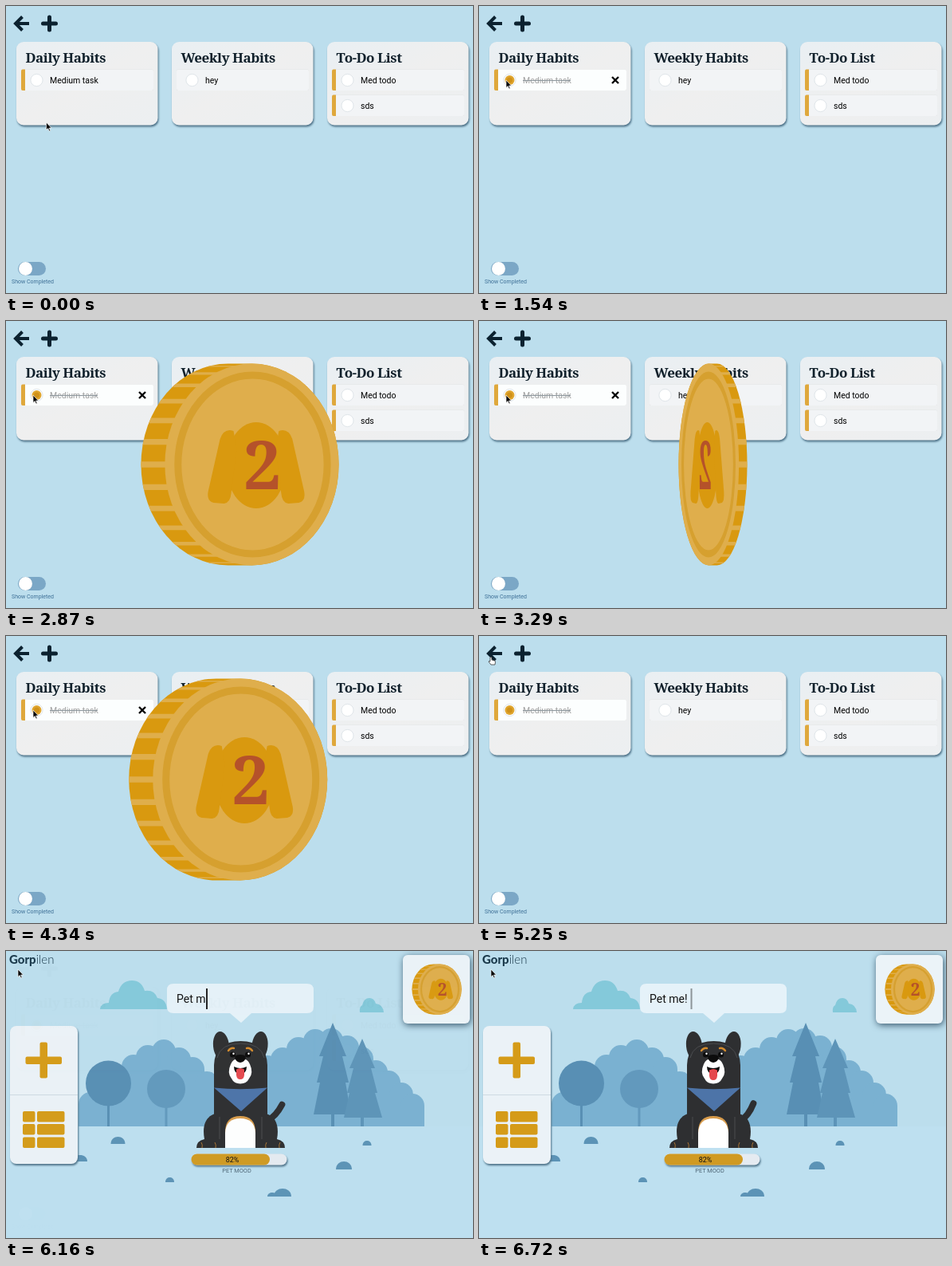
An HTML page for the animation above (6.79 s loop, 586 by 360 pixels).

```html
<!DOCTYPE html>
<html lang="en">
<head>
<meta charset="utf-8">
<style>
  html, body { margin: 0; width: 100%; height: 100%; overflow: hidden; background: #bcdeed; }
  svg { display: block; width: 586px; height: 360px; font-family: Roboto, sans-serif; }
  .title { font: 700 17px "Noto Serif", serif; letter-spacing: -.43px; fill: #10202b; }
  .panel { filter: drop-shadow(1.5px 2px 1.2px #4d7187); }
  .raised { filter: drop-shadow(1px 2px 4px #37566b); }
  .row { filter: drop-shadow(0 .7px .7px #0002); }
</style>
</head>
<body>
<svg viewBox="0 0 586 360">
  <defs>
    <linearGradient id="card" x2="1" y2="1">
      <stop stop-color="#e9eff3"/><stop offset=".5" stop-color="#efefef"/><stop offset="1" stop-color="#eceff1"/>
    </linearGradient>
    <path id="rim" d="M-15-126.5H15A109.5 126.5 0 0 1 15 126.5H-15A109.5 126.5 0 0 1-15-126.5Z"/>
    <clipPath id="rimClip"><use href="#rim"/></clipPath>
    <g id="coin">
      <use href="#rim" fill="#d9990f"/>
      <g id="ridges" clip-path="url(#rimClip)" stroke="#dfae4b"></g>
      <ellipse cx="15" rx="109.5" ry="126.5" fill="#dfae4c"/>
      <ellipse cx="16" rx="94" ry="112" fill="none" stroke="#d6a02f" stroke-width="9"/>
      <g fill="#d9990f">
        <ellipse cx="20.500" cy="1" rx="38" ry="54"/>
        <path id="ear" d="M-8-42Q-20-46-25-32L-40 34Q-42 46-33 48L-20 49Q-12 48-11 36L-4-20Z"/>
        <use href="#ear" transform="matrix(-1 0 0 1 41 0)"/>
      </g>
      <text x="28.500" y="31" text-anchor="middle" fill="#b5522a" style="font:700 84px 'Noto Serif',serif">2</text>
    </g>
  </defs>

  <g id="lists">
    <path d="M29 22H12M20.500 13.500L12 22L20.500 30.500" fill="none" stroke="#0c2230" stroke-width="4"/>
    <path d="M54.500 14V30M46.500 22H62.500" stroke="#0c2230" stroke-width="5" stroke-linecap="round"/>
    <g id="cards"></g>
    <g id="check">
      <circle cx="38.500" cy="93" r="6" fill="#dfa52e"/>
      <circle cx="38.500" cy="93" r="3.500" fill="#d0921a"/>
    </g>
    <path id="strike" stroke="#8d979d"/>
    <path id="remove" d="M167 89L175 97M175 89L167 97" stroke="#000" stroke-width="2.400"/>
    <rect x="15" y="321" width="35" height="17" rx="8.500" fill="#7ba7c6"/>
    <circle class="row" cx="24.500" cy="329.500" r="8.500" fill="#fff"/>
    <text x="7" y="348" font-size="7" fill="#3d6f96">Show Completed</text>
    <use id="reward" href="#coin"/>
  </g>

  <g id="home">
    <rect width="586" height="360" fill="#bcdeed"/>
    <rect y="220" width="586" height="140" fill="#bee0f0"/>
    <g fill="#84c9da">
      <path d="M118 73Q119 65 129 65Q130 52 141 51Q145 37 158 37Q170 37 174 50Q186 48 190 59Q201 60 202 73Z"/>
      <path d="M444 77Q443 70 447 68Q449 59 456 59Q462 59 464 66Q473 67 474 77Z"/>
    </g>
    <g id="hills" fill="#7ab1d1"></g>
    <g id="trees" fill="#588fb4">
      <circle cx="128.500" cy="166" r="28.500"/><path d="M127 190h3v30h-3z"/>
      <g fill="#6299bd"><circle cx="201" cy="173" r="24"/><path d="M199.500 190h3v30h-3z"/></g>
      <path d="M410 90L427 132H422L430 165H426L433 205H386L394 165H390L398 132H393ZM408 200h4v20h-4z"/>
      <path d="M447 110L463 147H458L466 178H463L472 209H424L431 178H428L436 147H431ZM445 205h4v15h-4z" fill="#5d94b8"/>
    </g>
    <g id="rocks" fill="#5c93b6"></g>
    <g class="panel">
      <rect x="5" y="94" width="85" height="173" rx="8" fill="#ebf2f7"/>
      <path d="M5 180.500H90" stroke="#cfdae2"/>
    </g>
    <g id="buttons" fill="#d59b18">
      <rect x="24.500" y="132.500" width="45.500" height="9.500" rx="2"/>
      <rect x="42.500" y="114.500" width="9.500" height="45" rx="2"/>
    </g>
    <rect class="raised" x="498" y="5" width="84" height="86" rx="6" fill="#ebf3f8"/>
    <use href="#coin" transform="translate(540.500 48) scale(.25)"/>
    <text x="4" y="16" fill="#1b3a4c" style="font:300 15px Lato,sans-serif"><tspan font-weight="800">Gorp</tspan>ilen</text>
    <path d="M210 41H378Q386 41 386 49V70Q386 78 378 78H308L295 90L281 78H210Q202 78 202 70V49Q202 41 210 41Z" fill="#e5f2f9"/>
    <text id="speech" x="214" y="65" font-size="14" fill="#111" xml:space="preserve"></text>
    <rect id="caret" y="47" width="2" height="26" fill="#222"/>

    <g fill="#2e2f31">
      <path id="tail" d="M328 213Q338 207 344 191" fill="none" stroke="#2e2f31" stroke-width="8" stroke-linecap="round"/>
      <path d="M263 204C250 207 246 220 249 236Q239 238 239 247H350Q350 238 340 236C343 220 339 207 326 204Z"/>
      <ellipse cx="270" cy="119" rx="10" ry="18" transform="rotate(-6 270 119)"/>
      <ellipse cx="318.500" cy="119" rx="10" ry="18" transform="rotate(6 318.500 119)"/>
      <path d="M261 143Q262 113 294.500 113Q327 113 328 143V240H261Z"/>
      <path d="M265 134Q269 116 294.500 116Q320 116 324 134M268 208V236M321 208V236" fill="none" stroke="#4a4c4f"/>
      <path d="M246 247Q247 243 245 240M343 247Q342 243 344 240M263 247Q264 243 262 240M326 247Q325 243 327 240" fill="none" stroke="#a87433"/>
      <path d="M275 247V227Q275 207 294 207Q313 207 313 227V247Z" fill="#d79b4b"/>
      <path d="M275 247V228Q276 210 294 210Q312 210 313 228V247Z" fill="#fff"/>
      <path d="M261 171.500Q294 175 328 171.500L295 201Z" fill="#4d74a8"/>
      <path d="M294 135Q303 134 306 142Q311 153 305 160Q302 166.500 294 166.500Q286 166.500 283 160Q277 153 282 142Q285 134 294 135Z" fill="#fff"/>
      <path d="M279 125Q282 121 286 122M309 125Q306 121 302 122" fill="none" stroke="#d18a2c" stroke-width="2.400" stroke-linecap="round"/>
      <g fill="#0c0c0c">
        <circle cx="284.500" cy="130" r="3.600"/><circle cx="303.500" cy="130" r="3.600"/>
        <path d="M287 133Q288 130 294 130Q300 130 301 133Q300 139 294 140Q288 139 287 133Z"/>
        <path d="M286 145Q294 149 302 145Q302 154 294 154Q286 154 286 145Z"/>
      </g>
      <g fill="#fff"><circle cx="285.500" cy="128.800" r="1.200"/><circle cx="304.500" cy="128.800" r="1.200"/></g>
      <path id="tongue" d="M289 149Q294 146 299 149V156Q298.500 161.500 294 161.500Q289.500 161.500 289 156Z" fill="#e5484d"/>
    </g>

    <rect class="panel" x="232.500" y="254.500" width="120" height="14" rx="7" fill="#e5ebf1"/>
    <rect x="232.500" y="254.500" width="98.500" height="14" rx="7" fill="#d09a22"/>
    <g text-anchor="middle">
      <text x="284" y="264.500" font-size="9" fill="#111">82%</text>
      <text x="289.500" y="277.500" font-size="7.400" fill="#4b6373">PET MOOD</text>
    </g>
  </g>

  <g id="pointer" stroke-width=".7">
    <path id="arrow" d="M0 0V9.500L2.200 7.500L3.700 11L5.200 10.400L3.700 7H6.600Z" fill="#000" stroke="#fff"/>
    <path id="hand" d="M-1 1Q0-.5 1 1V4L5 5Q6 6 5 10H0L-3 6Q-2 5-1 6Z" fill="#fff" stroke="#222"/>
  </g>
</svg>
<script>
const $ = id => document.getElementById(id);
const set = (id, name, value) => $(id).setAttribute(name, value);
const show = (id, on) => set(id, 'visibility', on ? 'inherit' : 'hidden');
const progress = (t, from, to) => Math.min(1, Math.max(0, (t - from) / (to - from)));
const sine = x => (1 - Math.cos(Math.PI * x)) / 2;
const cubic = x => x < .5 ? 4 * x ** 3 : 1 - 4 * (1 - x) ** 3;
const mix = (a, b, x) => a + (b - a) * x;

const row = (x, y, label, bar, id) => `
  <rect class="row" ${id ? `id="${id}"` : ''} x="${x + 6}" y="${y}" width="166" height="26.5" rx="2" fill="#f2f4f6"/>
  ${bar ? `<path d="M${x + 11} ${y}h-3q-2 0-2 2v22.500q0 2 2 2h3z" fill="#dfa83c"/>` : ''}
  <circle cx="${x + 25.5}" cy="${y + 13.5}" r="7.600" fill="#fff" stroke="#dfe5e9"/>
  <text ${id ? `id="${id}Text"` : ''} x="${x + 42}" y="${y + 17.5}" font-size="10.500">${label}</text>`;
const card = (x, title, rows) => `
  <rect class="panel" x="${x}" y="45" width="177.500" height="104.500" rx="9" fill="url(#card)"/>
  <text class="title" x="${x + 11.5}" y="71">${title}</text>${rows}`;

$('cards').innerHTML =
  card(13, 'Daily Habits', row(13, 79.5, 'Medium task', true, 'task')) +
  card(208, 'Weekly Habits', row(208, 79.5, 'hey')) +
  card(403, 'To-Do List', row(403, 79.5, 'Med todo', true) + row(403, 111.5, 'sds', true));

for (let k = -6; k <= 6; k++) {
  const a = k * 13 * Math.PI / 180, y = 126 * Math.sin(a);
  $('ridges').innerHTML += `<path d="M-130 ${y}H15" stroke-width="${7.5 * Math.cos(a)}"/>`;
}

// Each bush is a column with a round top
const bushes = [[106, 192], [118, 172], [138, 158], [160, 145], [178, 133], [198, 126], [217, 136], [234, 148],
  [252, 166], [280, 170], [310, 160], [328, 146], [347, 136], [367, 123], [388, 113], [408, 112], [428, 121],
  [446, 135], [464, 152], [480, 165], [496, 180], [510, 194]];
$('hills').innerHTML = bushes.map(([x, y]) => `<path d="M${x - 15} 220V${y}a15 15 0 0 1 30 0V220Z"/>`).join('');

const rocks = [[140.5, 242, 9, 9], [453, 244, 5.5, 6], [424, 274, 10, 10], [205.5, 290, 5.5, 6],
  [347, 308, 11, 10], [334, 308, 6, 5], [93, 264, 9, 8]];
$('rocks').innerHTML = rocks.map(([x, y, w, h]) =>
  `<path d="M${x - w} ${y}C${x - w} ${y - h * 1.33} ${x + w} ${y - h * 1.33} ${x + w} ${y}Z"/>`).join('');

$('buttons').innerHTML += [201, 217, 233.5].map(y =>
  `<rect x="21" y="${y}" width="15.500" height="13.500" rx="2"/><rect x="39" y="${y}" width="34.500" height="13.500" rx="2"/>`).join('');

const LOOP = 6790, STEP = 70, SPEECH = 'Pet me! ';

function drawLists(t, y) {
  const hover = y > 79 && y < 106, done = progress(t, 560, 980);
  set('task', 'fill', hover || done ? '#fcfefe' : '#f2f4f6');
  show('remove', hover);
  set('check', 'opacity', done);
  const grey = Math.round(160 * progress(t, 700, 1330));
  set('taskText', 'fill', `rgb(${grey},${grey},${grey})`);
  set('strike', 'd', `M55 93.500H${mix(55, 115, done)}`);
  show('strike', done);

  const drop = 320 * (1 - sine(progress(t, 1450, 2240)));
  const slide = 600 * sine(progress(t, 4189, 5694));
  const turn = 2 * Math.PI * cubic(progress(t, 2640, 4171));
  set('reward', 'transform', `translate(${293.5 - slide} ${180 + drop}) scale(${Math.cos(turn)} 1)`);
  show('reward', t >= 1470);
}

function drawHome(t) {
  const fade = progress(t, 5460, 6170);
  set('home', 'opacity', fade);
  show('home', fade > 0);
  const typed = SPEECH.slice(0, Math.max(0, Math.floor((t - 5630) / 100)));
  $('speech').textContent = typed.trimEnd();
  const space = typed.endsWith(' ') ? 3.5 : 0;
  set('caret', 'x', 213.5 + (typed ? $('speech').getComputedTextLength() : 0) + space + 1);
  set('caret', 'opacity', t < 6430 ? 1 : mix(1, .45, progress(t, 6430, 6720)));
  const wag = Math.cos((t - 6160) / 373 * 2 * Math.PI);
  set('tail', 'transform', `rotate(${3 * wag + 4} 331 211)`);
  set('tongue', 'transform', `translate(0 ${wag * -.5})`);
}

function frame() {
  const t = Math.floor(performance.now() % LOOP / STEP) * STEP;
  const reach = sine(progress(t, 0, 420)), leave = sine(progress(t, 4690, 5180));
  const x = mix(mix(50.5, 34, reach), 15, leave);
  const y = mix(mix(146, 93, reach), t < 5460 ? 26 : 23, leave);
  drawLists(t, y);
  drawHome(t);
  set('pointer', 'transform', `translate(${x} ${y})`);
  const onIcon = y < 33 && t < 5460;
  show('arrow', !onIcon);
  show('hand', onIcon);
  requestAnimationFrame(frame);
}
frame();
</script>
</body>
</html>
```
